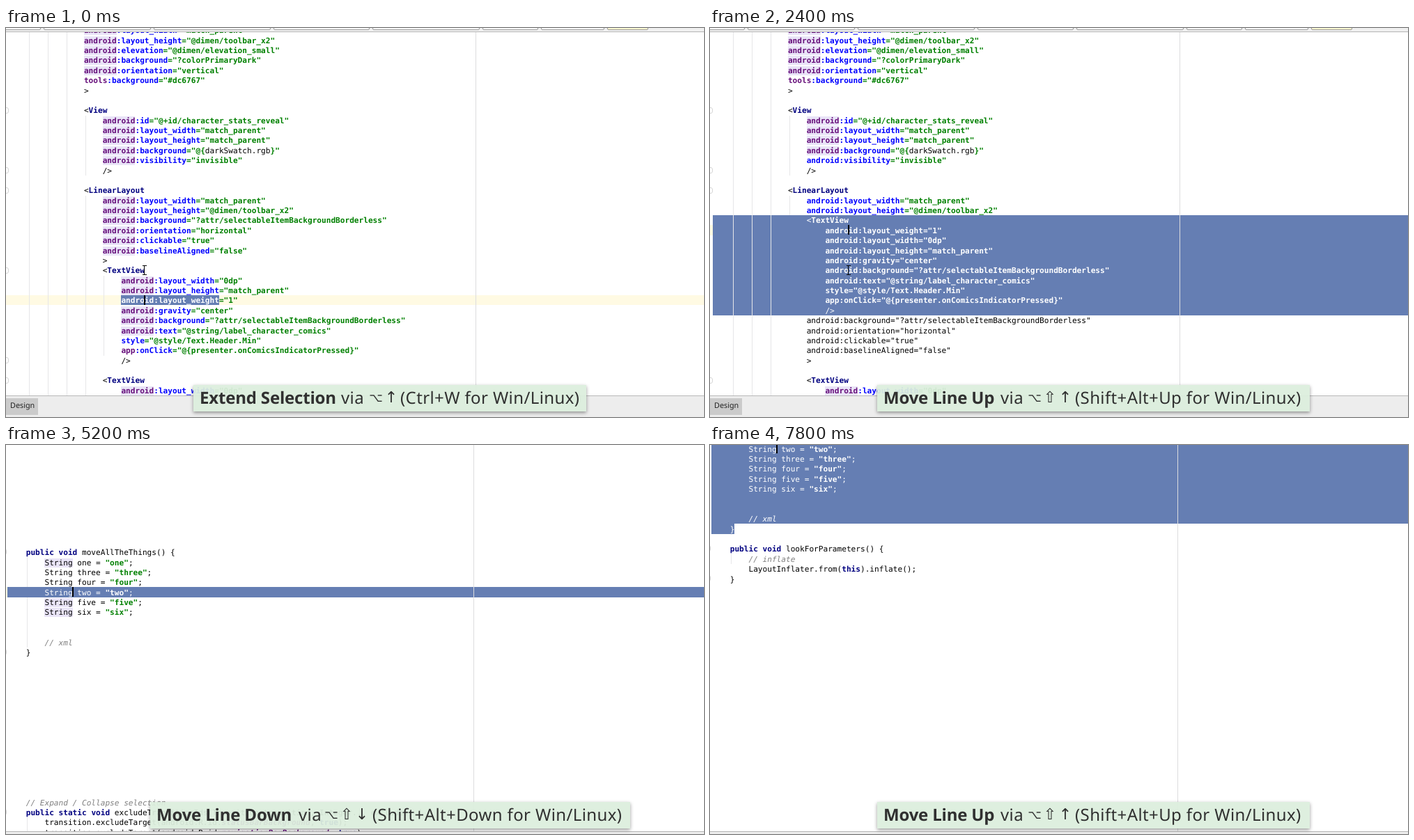
Animation of 1002x559 px, one loop 8000 ms. Source, as an HTML page:

```html
<!DOCTYPE html>
<html lang="en">
<head>
<meta charset="utf-8">
<title>Editor shortcuts</title>
<style>
html, body { margin: 0; width: 100%; height: 100%; overflow: hidden; background: #fff; }
body { text-rendering: geometricPrecision; font-family: "Noto Sans", "Open Sans", sans-serif; color: #000; }
#stage { position: relative; width: 1002px; height: 559px; overflow: hidden; }
#stage div, .cap > * { position: absolute; box-sizing: border-box; white-space: pre; }
.row { height: 14.375px; margin-top: 1.4px; font: 11.11px/14.375px "DejaVu Sans Mono", monospace; }
.sel { overflow: hidden; background: #657eb3; }
.sel * { color: #fff !important; background: none !important; }
.ns, .field { color: #660e7a; }
.field { font-style: italic; }
.attr { color: #00f; }
.str { color: #008000; }
.tag, .key { color: #000080; }
.note { color: #808080; }
.hl { background: #e9e4f7; }
.plain { font: normal 11.11px "DejaVu Sans Mono", monospace; color: #000; }
.current { left: 0; width: 1002px; height: 14.375px; background: #fffae3; }
.guide { width: 1px; background: #e6e6e8; }
.margin { width: 1px; background: #dcdcde; }
.caret { width: 2px; height: 14px; background: #000; }
.fold { left: -5px; width: 9px; height: 9px; border: 1px solid #d6d6d6; border-radius: 3px; background: #fff; }
.tabs { left: 0; top: 0; width: 1002px; height: 6px; background: #f0f0f0; border-bottom: 1px solid #b4b4b4; }
.tab { top: -4px; height: 7px; border: 1px solid #9c9c9c; background: #f6f6f6; border-radius: 0 0 2px 2px; }
.tab:last-child { background: #fdf6cf; }
.foot { left: 0; top: 528px; width: 1002px; height: 31px; background: #ededed; border-top: 1px solid #b8b8b8; }
.design { left: 0; top: 3px; width: 46px; height: 24px; padding-left: 6px; background: #cbcbcb; font-size: 10.8px; line-height: 22px; color: #222; }
.edge { left: 0; top: 555px; width: 1002px; height: 4px; background: #ededed; border-top: 1px solid #b4b4b4; }
.cap { top: 513px; height: 38px; background: rgba(220, 239, 221, .94); box-shadow: 0 2px 5px rgba(0, 0, 0, .4); color: #303030; font-size: 24px; line-height: 38px; letter-spacing: .38px; }
.cap b { left: 9px; letter-spacing: -.18px; }
.keys { display: flex; gap: 4px; font-family: "DejaVu Sans", sans-serif; font-size: 22px; letter-spacing: 0; }
.keys i { width: 18px; display: flex; justify-content: center; font-style: normal; }
.keys i:first-child { font-size: 17px; }
.popup { left: 340px; top: 25px; width: 423px; height: 416px; background: rgba(255, 255, 255, .97); box-shadow: 0 4px 12px rgba(0, 0, 0, .5); font-size: 12.8px; }
.title { left: 0; top: 0; width: 423px; height: 18px; padding-left: 177px; background: linear-gradient(#eee, #cdcdcd); border-bottom: 1px solid #b0b0b0; line-height: 17px; }
.find { left: 0; top: 1px; width: 105px; height: 26px; padding-left: 4px; background: #fff; border: 1px solid #999; font-size: 12.6px; line-height: 24px; }
.file { left: 176px; top: 23px; width: 242px; height: 19px; padding-left: 20px; background: #657eb3; color: #fff; line-height: 19px; }
.file b { font-weight: 400; color: #333; background: #b8cc7c; }
.badge { left: 3px; top: 3px; width: 13px; height: 13px; border-radius: 50%; background: #d3dfed; color: #456; font-size: 9px; line-height: 13px; text-align: center; }
.path { left: 0; top: 401px; width: 423px; height: 15px; padding-left: 3px; overflow: hidden; background: #f0f0f0; border-top: 1px solid #ccc; font-size: 9.7px; line-height: 14px; }
.bulb { left: 13px; top: 354px; width: 10px; height: 10px; border-radius: 50%; background: #a9c870; box-shadow: 0 3px 0 -2px #ddd; }
</style>
</head>
<body>
<div id="stage"></div>
<script>
const LINE = 14.375, CHAR = 6.69, STEP = 200, WIDTH = 1002;

const outer = `android:layout_width="match_parent"
android:layout_height="@dimen/toolbar_x2"
android:elevation="@dimen/elevation_small"
android:background="?colorPrimaryDark"
android:orientation="vertical"
tools:background="#dc6767"
>

<View
    android:id="@+id/character_stats_reveal"
    android:layout_width="match_parent"
    android:layout_height="match_parent"
    android:background="@{darkSwatch.rgb}"
    android:visibility="invisible"
    />

<LinearLayout
    android:layout_width="match_parent"
    android:layout_height="@dimen/toolbar_x2"
    android:background="?attr/selectableItemBackgroundBorderless"
    android:orientation="horizontal"
    android:clickable="true"
    android:baselineAligned="false"
    >`.split('\n');

const view = `    <TextView
        android:layout_width="0dp"
        android:layout_height="match_parent"
        android:gravity="center"
        android:background="?attr/selectableItemBackgroundBorderless"
        android:text="@string/label_character_comics"
        style="@style/Text.Header.Min"
        app:onClick="@{presenter.onComicsIndicatorPressed}"
        />`.split('\n');
const weight = '        android:layout_weight="1"';
const tail = ['', '    <TextView', '        android:layout_width="0dp"'];

const lookup = `public void lookForParameters() {
    // inflate
    LayoutInflater.from(this).inflate();
}`.split('\n');

const below = `// Expand / Collapse selection
public static void excludeTransitionIds(Transition transition, Integer... excludes) {
    transition.excludeTarget(android.R.id.statusBarBackground, true);
    transition.excludeTarget(android.R.id.navigationBarBackground, true);`.split('\n');

const captions = {
  extend: [269, 564, 'Extend Selection', 212, '⌥↑', 253, '(Ctrl+W for Win/Linux)', 297],
  up: [240, 621, 'Move Line Up', 177, '⌥⇧↑', 217, '(Shift+Alt+Up for Win/Linux)', 284],
  down: [207, 689, 'Move Line Down', 213, '⌥⇧↓', 251, '(Shift+Alt+Down for Win/Linux)', 319],
  recent: [299, 503, 'Recent Files', 161, '⌘E', 200, '(Ctrl+E for Win/Linux)', 242]
};

const box = (cls, x, y, w, h, html = '') =>
  `<div class="${cls}" style="left:${x}px;top:${y}px;width:${w}px;height:${h}px">${html}</div>`;
const row = (html, x, y) => `<div class="row" style="left:${x}px;top:${y}px">${html}</div>`;
const bold = (cls, text) => `<b class="${cls}">${text}</b>`;

function caption(name) {
  const [x, w, title, viaX, keys, keysX, alt, altX] = captions[name];
  const cells = [...keys].map(k => `<i>${k}</i>`).join('');
  return `<div class="cap" style="left:${x}px;width:${w}px"><b>${title}</b>` +
    `<span style="left:${viaX}px">via</span>` +
    `<span class="keys" style="left:${keysX}px">${cells}</span>` +
    `<span style="left:${altX}px">${alt}</span></div>`;
}

function markXml(s, fresh) {
  const attr = s.match(/^( *)(?:(\w+)(:))?(\w+)(=.*)$/);
  if (attr) {
    const [, pad, ns, colon, name, value] = attr;
    const nsClass = !fresh ? 'attr' : ns === 'android' ? 'ns hl' : 'ns';
    return pad + (ns ? bold(nsClass, ns) : '') + bold('attr', (colon || '') + name) +
      bold('str', value.replace('darkSwatch.rgb', '<span class="plain">$&</span>'));
  }
  return s.replace(/<(\w+)/, (m, tag) => '&lt;' + bold('tag', tag));
}

function markJava(s, fresh) {
  const rule = /(\/\/.*)|("\w+")|\b(public|static|void|this|true)\b|(\w+BarBackground)|(String)/g;
  return s.replace(rule, (m, note, str, key, field) =>
    note ? `<i class="note">${m}</i>` :
    str ? bold('str', m) :
    key ? bold('key', m) :
    field ? bold('field', m) :
    fresh ? `<span class="hl">${m}</span>` : m);
}

// Selected rows: the first begins at xa, the last ends at xb.
function select(rows, textX, top, left, xa, xb) {
  return rows.map((html, i) => {
    const from = i ? left : xa;
    const to = i < rows.length - 1 ? WIDTH : xb;
    return box('sel', from, top + i * LINE, to - from, LINE, row(html, textX - from, 0));
  }).join('');
}

function popup(query) {
  const hit = query.length;
  const name = 'Editor.java';
  return '<div class="popup"><div class="title">Recent Files</div>' +
    (query ? `<div class="find"><b>Search for:</b> ${query}</div>` : '') +
    '<div class="guide" style="left:152px;top:18px;height:383px"></div>' +
    '<div style="left:25px;top:140px;color:#777">Nothing to show</div>' +
    `<div class="file"><div class="badge">C</div><b>${name.slice(0, hit)}</b>${name.slice(hit)}</div>` +
    '<div class="path">~/Fennel Vault/Proyectos/abiertos/Sentries/app/src/main/java/tobirk/sentries/idea</div></div>';
}

const tabEdges = [-6, 50, 208, 380, 522, 680, 764, 859, 922];
const tabs = '<div class="tabs">' + tabEdges.slice(1).map((end, i) =>
  `<div class="tab" style="left:${tabEdges[i] + 4}px;width:${end - tabEdges[i] - 4}px"></div>`
).join('') + '</div>';

// at: place of the weight attribute, lift: rows the tag has moved up.
function xml(cap, kind, lift = 0, at = 1, query) {
  const x0 = 111.9, first = 24 - lift;
  const y = i => -4.1 + i * LINE;
  const col = c => x0 + c * CHAR;
  const block = [...view];
  block.splice(at, 0, weight);
  const lines = [...outer.slice(0, first), ...block, ...outer.slice(first), ...tail];
  const html = lines.map((s, i) => {
    const passed = i >= first + 10 && i < 34;
    return passed ? s : markXml(s, lift < 2 || i < 13 || i > 33);
  });

  const caretRow = first + at;
  const spans = {
    word: [at, at, 8, 29], attr: [at, at, 8, 33],
    attrs: [1, 8, 8, lines[first + 8].length], tag: [0, 9, 4, 10], block: [0, 9]
  };
  const [a, b, ca, cb] = spans[kind];
  const whole = kind === 'block';
  const chosen = select(html.slice(first + a, first + b + 1), x0, y(first + a), 4,
    whole ? 4 : col(ca), whole ? WIDTH : col(cb));

  const guides = [33, 60, 87].map(x => box('guide', x, 6, 1, 522)).join('') +
    box('guide', 114, 126, 1, 86) +
    box('guide', 114, 241, 1, (lift < 2 ? 528 : y(first)) - 241) +
    (whole ? '' : box('guide', 140, 356, 1, 115));
  const folds = [119, 205, 234, 349, 478, 507]
    .filter(f => !lift || f < 300 || f > 500)
    .map(f => `<div class="fold" style="top:${f - 5}px"></div>`).join('');
  const mouse = box('caret', 198, 342, 1, 12) + box('caret', 196, 341, 6, 1) + box('caret', 196, 354, 6, 1);
  const current = `<div class="current" style="top:${y(caretRow)}px"></div>`;
  const inPopup = query !== undefined;

  return current + (whole ? '' : guides) + html.map((s, i) => row(s, x0, y(i))).join('') +
    chosen + (whole ? guides : '') + box('margin', 674, 6, 1, 522) + folds +
    (inPopup ? '<div class="bulb"></div>' : box('caret', 198, y(caretRow), 2, 14) + mouse) +
    tabs + '<div class="foot"><div class="design">Design</div></div>' +
    (inPopup ? popup(query) : '') + caption(cap);
}

// at: place of "two" among the statements, lift: rows the method has moved up.
function java(cap, kind, at = 1, lift = 0) {
  const x0 = 28.7, top = 146.8;
  const y = i => top + i * LINE;
  const end = lift > 12;
  const names = ['one', 'three', 'four', 'five', 'six'];
  names.splice(at, 0, 'two');
  const method = ['public void moveAllTheThings() {',
    ...names.map(n => `    String ${n} = "${n}";`), '', '', '    // xml', '}'];
  const html = method.map((s, i) => markJava(s, i < 2 || i > at));
  const place = (rows, from) => rows.map((s, i) => row(s, x0, y(from + i))).join('');
  const mark = s => markJava(s, false);

  const caretRow = at + 1;
  const stmt = x0 + 4 * CHAR;
  const spans = {
    none: null,
    word: [caretRow, caretRow, stmt, stmt + 6 * CHAR],
    stmt: [caretRow, caretRow, stmt, x0 + method[caretRow].length * CHAR],
    line: [caretRow, caretRow, 2, WIDTH],
    body: [1, 9, stmt, x0 + 10 * CHAR],
    method: [0, 10, x0 - .7, x0 + CHAR]
  };
  const span = spans[kind];
  const chosen = span ? select(html.slice(span[0], span[1] + 1), x0, y(span[0] - lift), 2, span[2], span[3]) : '';
  const current = kind === 'method' || kind === 'body' ? '' :
    `<div class="current" style="top:${y(caretRow - lift)}px"></div>`;
  const folds = (end ? [149, 192] : [154 - lift * LINE, 298 - lift * LINE, 528])
    .map(f => `<div class="fold" style="left:-8px;top:${f - 5}px"></div>`).join('');
  const others = end ? place(lookup.map(mark), 12 - lift) : place(below.map(mark), 25);

  return current + box('guide', 30, y(1 - lift), 1, 9 * LINE) +
    (end ? box('guide', 30, y(13 - lift), 1, LINE) : box('guide', 30, 535, 1, 20)) +
    place(html, -lift) + others + chosen + box('margin', 671, 0, 1, 555) + folds +
    box('caret', 95, y(caretRow - lift), 2, 14) + '<div class="edge"></div>' + caption(cap);
}

const steps = [
  xml('extend', 'word', 0, 3), xml('extend', 'attr', 0, 3),
  xml('up', 'attr', 0, 2), xml('up', 'attr', 0, 1),
  xml('extend', 'attr'), xml('extend', 'attrs'), xml('extend', 'tag'),
  ...[0, 1, 2, 3, 4, 5].map(n => xml('up', 'block', n)),
  ...[5, 4, 3, 2, 1, 0].map(n => xml('down', 'block', n)),
  xml('recent', 'block', 0, 1, ''), xml('recent', 'block', 0, 1, 'edi'),
  java('recent', 'none'), java('extend', 'word'), java('extend', 'stmt'),
  ...[1, 2, 3, 4].map(n => java('down', 'line', n)),
  ...[3, 2, 1, 1].map(n => java('up', 'line', n)),
  java('extend', 'body'), java('extend', 'method'),
  ...[0, 2, 5, 9, 11, 12.33].map(n => java('up', 'method', 1, n))
];

const stage = document.getElementById('stage');
const start = performance.now();
let shown = -1;
function tick() {
  const now = Math.floor((performance.now() - start) / STEP) % steps.length;
  if (now !== shown) stage.innerHTML = steps[shown = now];
  requestAnimationFrame(tick);
}
tick();
</script>
</body>
</html>
```
